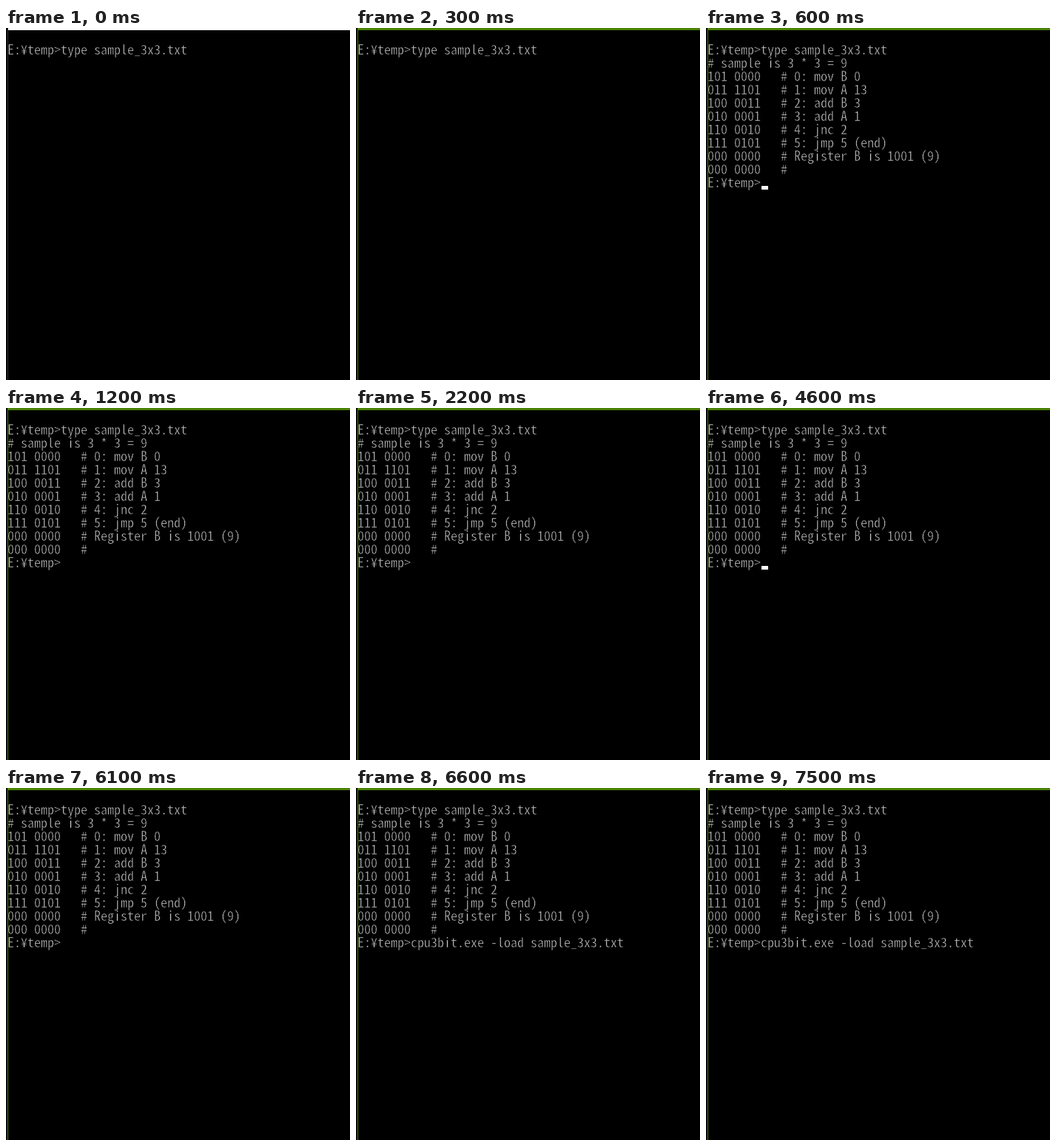
An HTML page for the animation above (8000 ms loop, 465 px wide and 477 px high).

```html
<!DOCTYPE html>
<html lang="en">
<head>
<meta charset="utf-8">
<title>Console session</title>
<style>
  html, body { margin: 0; width: 100%; height: 100%; overflow: hidden; background: #000; }
  svg { display: block; width: 465px; height: 477px; }
  /* The dark outline trims the letters to hairline console strokes. */
  text {
    font: 18px "Noto Sans Mono CJK JP", "Noto Sans CJK JP", "Noto Sans Mono", monospace;
    fill: #c8c8c8; stroke: #000; stroke-width: .5px; white-space: pre;
  }
</style>
</head>
<body>
<svg id="stage" viewBox="0 0 465 477" shape-rendering="crispEdges">
  <rect width="465" height="477" fill="#000"/>
  <rect id="side" x="2" y="0" width="1" height="477"/>
  <rect id="bar" x="3" y="0" width="462" height="3"/>
  <g id="screen"></g>
  <rect id="cursor" width="9" height="5" fill="#fff"/>
</svg>
<script>
const LOOP = 8000;
const LEFT = 3, TOP = 22, CELL = 9, ROW = 18;
const BASE = 14, BEARING = -1;
const PROMPT = "E:¥temp>";
const COMMAND = "cpu3bit.exe -load sample_3x3.txt";
const FOCUS = 300, LISTING = 600, PASTE = 6200;
const BLINKS = [600, 1200, 1700, 2200, 2700, 3200, 3700, 4100, 4600,
                5100, 5600, 6100, 6200, 6600, 7000, 7500];
const LISTED = [
  "# sample is 3 * 3 = 9",
  "101 0000   # 0: mov B 0",
  "011 1101   # 1: mov A 13",
  "100 0011   # 2: add B 3",
  "010 0001   # 3: add A 1",
  "110 0010   # 4: jnc 2",
  "111 0101   # 5: jmp 5 (end)",
  "000 0000   # Register B is 1001 (9)",
  "000 0000   #",
  PROMPT
];
const LAST = LISTED.length;

const $ = id => document.getElementById(id);
const side = $("side"), bar = $("bar"), cursor = $("cursor"), screen = $("screen");

const cellX = col => LEFT + col * CELL;

// Every character sits in its own console cell.
function addLine(str, row, col = 0) {
  const el = document.createElementNS("http://www.w3.org/2000/svg", "text");
  el.setAttribute("x", [...str].map((_, i) => cellX(col + i) + BEARING).join(" "));
  el.setAttribute("y", TOP + row * ROW + BASE);
  el.textContent = str;
  screen.append(el);
  return el;
}

function show(el, on) {
  el.setAttribute("visibility", on ? "visible" : "hidden");
}

addLine(PROMPT + "type sample_3x3.txt", 0);
const listing = LISTED.map((str, i) => addLine(str, i + 1));
const command = addLine(COMMAND, LAST, PROMPT.length);
cursor.setAttribute("y", TOP + LAST * ROW + 12);

function draw(t) {
  const focused = t >= FOCUS, pasted = t >= PASTE;
  bar.setAttribute("fill", focused ? "#498205" : "#fff");
  side.setAttribute("fill", focused ? "#498205" : "#333");
  listing.forEach(el => show(el, t >= LISTING));
  show(command, pasted);
  cursor.setAttribute("x", cellX(PROMPT.length + (pasted ? COMMAND.length : 0)));
  show(cursor, BLINKS.filter(b => b <= t).length % 2 === 1);
}

const start = performance.now();
function tick() {
  draw((performance.now() - start) % LOOP);
  requestAnimationFrame(tick);
}
draw(0);
requestAnimationFrame(tick);
</script>
</body>
</html>
```
